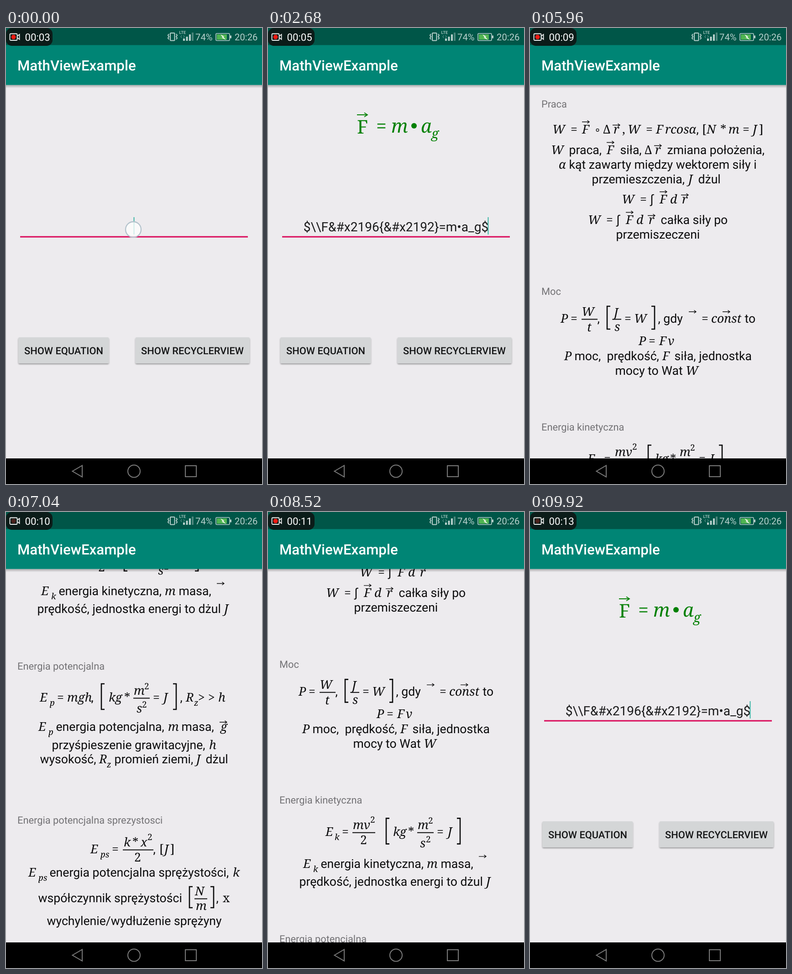
An HTML page that plays this animation: 561x998 px, repeating every 10 s.

```html
<!DOCTYPE html>
<html lang="en">
<head>
<meta charset="utf-8">
<title>MathViewExample</title>
<style>
  html, body { margin: 0; width: 100%; height: 100%; overflow: hidden; background: #000; }
  svg { display: block; width: 561px; height: 998px; }
  text { font-family: Roboto, sans-serif; white-space: pre; text-rendering: geometricPrecision; }
  .r, .i, .s { font-size: 26.6px; fill: #0c0c0d; }
  .i, .s, .b, .p { font-family: "Noto Serif", serif; }
  .i, .b { font-style: italic; }
  .b { font-size: 18.6px; }
  .p { font-size: 19px; }
  .h { font-size: 21.8px; fill: #737275; }
  .ln { fill: none; stroke: #0c0c0d; }
  .title { font-size: 31.2px; font-weight: 500; fill: #fff; }
  .btn { font-size: 21.8px; font-weight: 500; fill: #141516; text-anchor: middle; }
  .bar text { font-size: 20.3px; fill: #b9d0cc; }
  .nav { fill: none; stroke: #7b7b7b; stroke-width: 2; }
  #eq text { font-size: 41px; fill: #008000; }
  #eq .b { font-size: 29px; }
</style>
</head>
<body>
<svg viewBox="0 0 561 998">
  <defs>
    <linearGradient id="shade" x2="0" y2="1">
      <stop offset="0" stop-color="#000" stop-opacity=".28"/>
      <stop offset="1" stop-color="#000" stop-opacity="0"/>
    </linearGradient>
    <filter id="soft" x="-10%" y="-20%" width="120%" height="150%">
      <feDropShadow dx="0" dy="2" stdDeviation="1.5" flood-opacity=".35"/>
    </filter>
    <g id="head">
      <rect y="124.700" width="561" height="7" fill="url(#shade)"/>
      <rect y="37" width="561" height="87.700" fill="#008575"/>
      <rect width="561" height="37.400" fill="#005648"/>
      <text class="title" x="25" y="93">MathViewExample</text>
    </g>
  </defs>

  <g id="main">
    <rect width="561" height="998" fill="#edebee"/>
    <g id="eq">
      <text class="s" x="195" y="230.5">F</text>
      <path d="M195 190h23m-7 -4.500l7 4.500l-7 4.500" fill="none" stroke="#008000" stroke-width="1.800"/>
      <text class="s" x="237" y="229">=</text>
      <text class="i" x="270" y="229">m</text>
      <circle cx="320" cy="214" r="6" fill="#008000"/>
      <text class="i" x="335" y="229">a</text>
      <text class="b" x="358" y="241">g</text>
    </g>
    <path d="M31 457H530" stroke="#da0a5a" stroke-width="3"/>
    <text id="input" x="280.5" y="444.5" text-anchor="middle" font-size="28.05" fill="#1b1b1c">$\\F&amp;#x2196{&amp;#x2192}=m•a_g$</text>
    <rect id="cursor" y="414" width="2" height="38" fill="#3db5a6"/>
    <path id="handle" d="M280.5 456l11 8a16 16 0 1 1 -22 0z" fill="#26a69a"/>
    <g filter="url(#soft)" fill="#d4d6d7">
      <rect id="b1" x="27" y="677" width="198.500" height="57" rx="3"/>
      <rect id="b2" x="283.500" y="677" width="250.500" height="57" rx="3"/>
    </g>
    <text class="btn" x="126.500" y="714">SHOW EQUATION</text>
    <text class="btn" x="408.500" y="714">SHOW RECYCLERVIEW</text>
    <use href="#head"/>
  </g>

  <g id="list">
    <rect width="561" height="998" fill="#edebee"/>
    <g id="rows"></g>
    <circle id="glow" cx="185" cy="2176" r="1310" fill="#008575"/>
    <use href="#head"/>
  </g>

  <g class="bar">
    <rect width="102" height="39" rx="13" fill="#0b1c19"/>
    <rect x="8.500" y="12.500" width="16" height="14.500" rx="2" fill="none" stroke="#f2f2f2" stroke-width="1.800"/>
    <path d="M24.500 18l5 -4v11l-5 -4" fill="none" stroke="#f2f2f2" stroke-width="1.800"/>
    <circle id="dot" cx="16.500" cy="19.700" r="5"/>
    <text id="clock" x="41.500" y="28" style="font-size:22.200px;fill:#fff"></text>
    <g fill="none" stroke="#b9d0cc" stroke-width="2">
      <rect x="360" y="11" width="9.500" height="16.500" rx="1"/>
      <path d="M357 13l-2 3l2 3l-2 3l2 3M373 13l2 3l-2 3l2 3l-2 3"/>
    </g>
    <text x="379.500" y="13" style="font-size:9px;font-weight:500">LTE</text>
    <path d="M385 16l-2 3l2 3M389 16l2 3l-2 3" fill="none" stroke="#7fa9a2"/>
    <path d="M388 23h4v5h-4zM394.500 19h4v9h-4zM401 14h4v14h-4z" fill="#b9d0cc"/>
    <path d="M407 10h4v18h-4z" fill="#4b857b"/>
    <text x="415" y="27">74%</text>
    <rect x="460" y="12" width="30" height="15.500" rx="2" fill="none" stroke="#b9d0cc" stroke-width="1.600"/>
    <path d="M491 16.500h3v6h-3z" fill="#b9d0cc"/>
    <rect x="462" y="14" width="22" height="11.500" fill="#4fb551"/>
    <path d="M470 14l9 5h-3l6 7l-10 -5h3z" fill="#eef5ee"/>
    <text x="501" y="27">20:26</text>
  </g>

  <rect y="942" width="561" height="56"/>
  <g class="nav">
    <path d="M145.500 970L167 957.500V982.500Z"/>
    <circle cx="280.500" cy="970" r="13.500"/>
    <rect x="393" y="958" width="24" height="24"/>
  </g>
  <circle id="touch" r="17" fill="#fff" fill-opacity=".74" stroke="#b3c2cc" stroke-width="2.300"/>
</svg>

<script>
const $ = id => document.getElementById(id);
const LOOP = 10000, STEP = 40;

// One row: parts split by "|", each "<kind><x>[,<dy>] <text>".
// r sans, i italic, s serif, b subscript, p superscript, v vector,
// a arrow, o/c big bracket, _ fraction bar, q ring, h heading
function part(base, src) {
  const [, kind, xs, dy, body] = src.match(/^(\w)(\d+)(?:,(-?\d+))? ?(.*)$/);
  const x = +xs, y = base + +(dy || 0);
  const text = (k, px, py) => `<text class="${k}" x="${px}" y="${py}">${body.replace(/>/g, "&gt;")}</text>`;
  const path = (d, w) => `<path class="ln" d="${d}" stroke-width="${w}"/>`;
  const arrow = (ax, ay) => path(`M${ax} ${ay}h16m-4.5 -3.2l4.500 3.2l-4.500 3.2`, 1.3);
  switch (kind) {
    case "r": return text("r", x - .5, y);
    case "b": return text("b", x, y + 9);
    case "v": return text("i", x, y) + arrow(x - (body === "F" ? 0 : 2), y - (body === "F" ? 25.5 : 18.5));
    case "a": return arrow(x, y);
    case "_": return path(`M${x} ${y - 7.5}h${body}`, 2);
    case "q": return `<circle class="ln" cx="${x}" cy="${y - 7.5}" r="2.8" stroke-width="1.3"/>`;
    case "o":
    case "c": {
      // x is the outer edge of the bracket
      const w = kind === "o" ? 7 : -7, h = +body;
      return path(`M${x + w} ${y - 11 - h / 2}h${-w}v${h}h${w}`, 2.6);
    }
    default: return text(kind, x, y);
  }
}
const block = (dy, rows) => `<g transform="translate(0 ${dy})">` +
  rows.map(([y, src]) => src.split("|").map(s => part(y, s)).join("")).join("") + "</g>";

$("rows").innerHTML = block(0, [
  [174, "h25 Praca"],
  [231, "i49 W|s89 =|v114 F|q148|s160 Δ|v183 r|s202 ,|i214 W|s254 =|i276 F|i296 rcosα|r365 ,|s377 [|i387 N|s417 *|i435 m|s466 =|i488 J|s502 ]"],
  [276, "i46 W|r86 praca,|v168 F|r198 siła,|s251 Δ|v274 r|r301 zmiana położenia,"],
  [308, "i63 α|r86 kąt zawarty między wektorem siły i"],
  [339.5, "r136 przemieszczenia,|i347 J|r369 dżul"],
  [384, "i201 W|s241 =|r264 ∫|v284 F|i307 d|v333 r"],
  [429, "i127 W|s167 =|r190 ∫|v210 F|i233 d|v260 r|r287 całka siły po"],
  [461, "r189 przemiszeczeni"]
]) + block(0, [
  [584, "h25 Moc"],
  [645, "i67 P|s89 =|i113,-15 W|_113 35|i125,19 t|r148 ,|o169 50|i184,-13 J|_181 19|i185,18 s|s207 =|i228 W|c273 50|r281 , gdy|a348,-24|s376 =|i397 const|a422,-24|r471 to"],
  [694, "i238 P|s260 =|i283 F|i302 v"],
  [727, "i75 P|r98 moc,|r169 prędkość,|i290 F|r317 siła, jednostka"],
  [759, "r187 mocy to Wat|i341 W"]
]) + block(840, [
  [41, "h25 Energia kinetyczna"],
  [112, "i126 E|b146 k|s162 =|i186,-15 mv|p224,-29 2|_185 50|s202,18 2|o259 56|i274 kg|s307 *|i328,-15 m|p351,-27 2|_327 36|i333,25 s|p346,14 2|s370 =|i394 J|c421 56"],
  [181.5, "i77 E|b99 k|r116 energia kinetyczna,|i348 m|r379 masa,|a462,-25"],
  [221, "r69 prędkość, jednostka energi to dżul|i478 J"]
]) + block(840, [
  [345, "h25 Energia potencjalna"],
  [415, "i74 E|b96 p|s112 =|i134 mgh|r187 ,|o209 56|i225 kg|s259 *|i280,-15 m|p303,-27 2|_279 36|i286,24 s|p298,13 2|s322 =|i345 J|c373 56|r382 ,|i394 R|b412 z|s421 >|s443 >|i465 h"],
  [478.5, "i71 E|b93 p|r110 energia potencjalna,|i355 m|r385 masa,|v470 g"],
  [518.5, "r101 przyśpieszenie grawitacyjne,|i445 h"],
  [550, "r75 wysokość,|i204 R|b221 z|r238 promień ziemi,|i417 J|r438 dżul"]
]) + block(840, [
  [682, "h25 Energia potencjalna sprezystosci"],
  [747, "i185 E|b207 ps|s232 =|i258,-15 k|s277,-15 *|i295,-15 x|p310,-29 2|_256 67|s281,18 2|r323 ,|s336 [|i347 J|s360 ]"],
  [797.5, "i49 E|b71 ps|r96 energia potencjalna sprężystości,|i497 k"],
  [854, "r71 współczynnik sprężystości|o402 46|i414,-15 N|_413 28|i416,17 m|c455 46|r461 ,|s475 x"],
  [904, "r90 wychylenie/wydłużenie sprężyny"]
]) + block(1076, [
  [792, "h25 Zasada zachowania energii"],
  [836, "r80 W izolowanym układzie, całkowita"],
  [867.5, "r61 energia mechaniczna nie zmienia sie."]
]);

const span = (t, a, b) => Math.min(1, Math.max(0, (t - a) / (b - a)));
const inside = (t, list) => list.some(([a, b]) => t >= a && t < b);
const out3 = p => 1 - (1 - p) ** 3;
const show = (id, on) => $(id).setAttribute("visibility", on ? "visible" : "hidden");

const dragY = t => 760 - 293 * (1 - (1 - span(t, 7120, 7760)) ** 1.6);
function scrollAt(t) {
  if (t < 7120) return 840 * out3(span(t, 6080, 6960));
  if (t < 8160) return 840 + Math.min(236, 760 - dragY(t));
  return 1076 * (1 - out3(span(t, 8160, 9080)));
}

// start, end, x, y(t), opacity
const touches = [
  [0, 560, 279, () => 441, 1],
  [1880, 2160, 122, () => 727, 1],
  [3840, 4080, 408, () => 712, 1],
  [6080, 6280, 104, t => 760 - scrollAt(t), .8],
  [7120, 7840, 102, dragY, .65],
  [8160, 8320, 106, t => 1406 - scrollAt(t), .8],
  [9200, 9360, 156, () => 970, .8]
];
const dim = [[600, 1200], [1880, 2400], [3080, 3480], [4200, 4720], [5120, 5520], [6500, 7200], [7900, 8400], [9000, LOOP]];
const cursorOff = [[2100, 2560], [3080, 3480]];

function draw(t) {
  $("clock").textContent = "00:" + String(Math.floor((t + 3180) / 1000)).padStart(2, "0");
  $("dot").setAttribute("fill", inside(t, dim) ? "#4a211c" : "#f01a12");

  const pasted = t >= 1320;
  show("input", pasted);
  show("cursor", !inside(t, cursorOff));
  $("cursor").setAttribute("x", pasted ? 481.5 : 279.5);
  show("handle", t >= 560 && t < 1320);
  show("eq", t >= 2200);
  $("b1").setAttribute("fill", inside(t, [[1920, 2280]]) ? "#bfc1c2" : "#d4d6d7");
  $("b2").setAttribute("fill", inside(t, [[3880, 4240]]) ? "#bfc1c2" : "#d4d6d7");

  const open = out3(span(t, 4320, 4760)) - out3(span(t, 9400, 9760));
  $("main").setAttribute("transform", `translate(${-140 * open} 0)`);
  $("list").setAttribute("transform", `translate(${561 * (1 - open)} 0)`);
  $("rows").setAttribute("transform", `translate(0 ${-scrollAt(t)})`);

  const pull = span(t, 7400, 7720) * (1 - span(t, 7840, 8120));
  $("glow").setAttribute("opacity", .11 * pull);
  $("glow").setAttribute("cy", 2176 + 76 * (1 - pull));

  const hit = touches.find(([a, b]) => t >= a && t < b + 120);
  show("touch", hit);
  if (hit) {
    const [, end, x, y, alpha] = hit;
    $("touch").setAttribute("cx", x);
    $("touch").setAttribute("cy", y(Math.min(t, end)));
    $("touch").setAttribute("opacity", alpha * (1 - span(t, end, end + 120)));
  }
}

const start = performance.now();
function tick() {
  const t = (performance.now() - start) % LOOP;
  draw(Math.floor(t / STEP) * STEP);
  requestAnimationFrame(tick);
}
tick();
</script>
</body>
</html>
```
